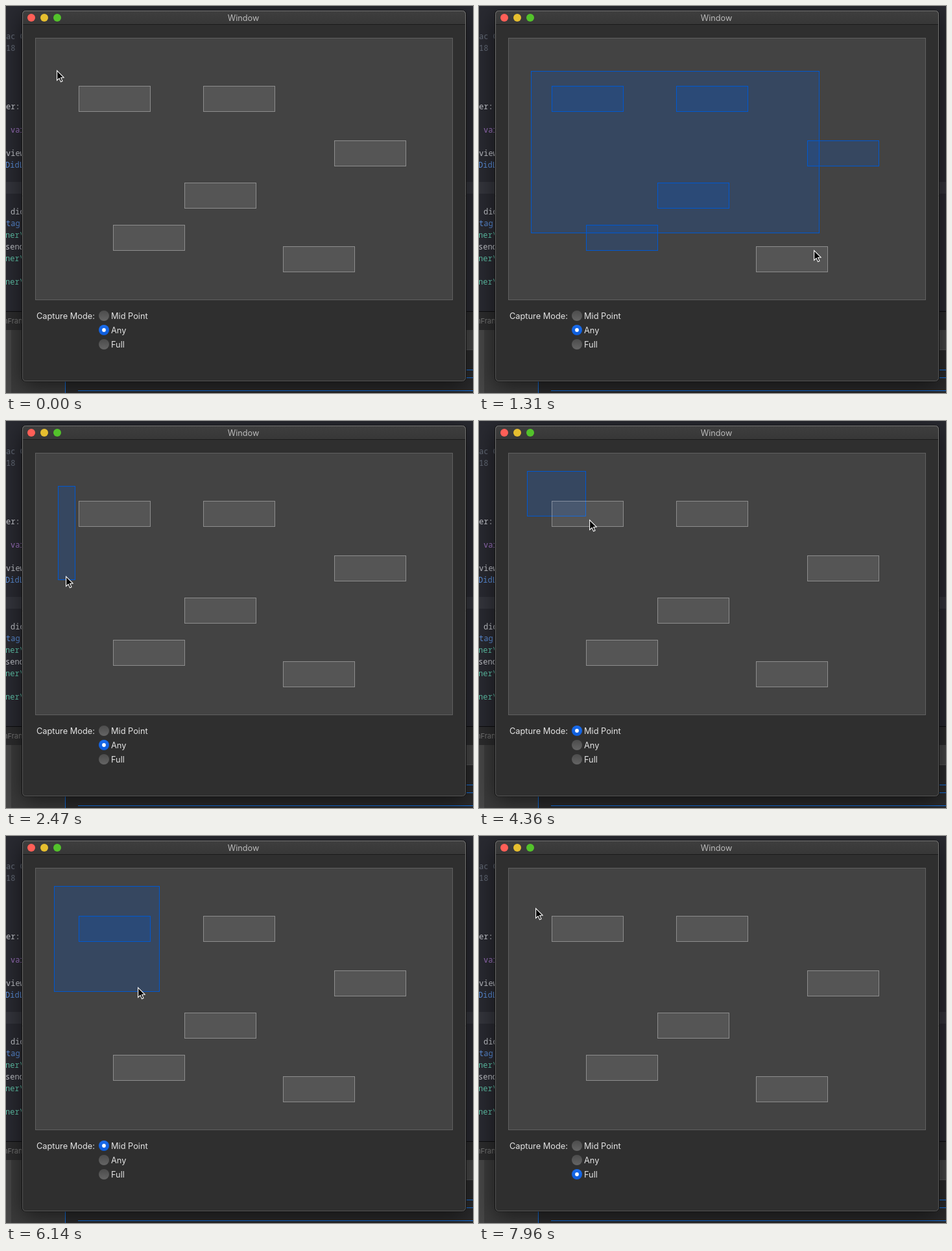
Animation, 720 px wide and 596 px high, one loop 8000 ms. Source, as an HTML page with a canvas:

```html
<!DOCTYPE html>
<html lang="en">
<head>
<meta charset="utf-8">
<title>Capture modes</title>
<style>
html, body { margin: 0; width: 100%; height: 100%; overflow: hidden; background: #222; }
canvas { display: block; }
</style>
</head>
<body>
<canvas id="stage" width="720" height="596"></canvas>
<script>
const W = 720, H = 596, LOOP = 8000;
const ctx = document.getElementById('stage').getContext('2d');
const UI = 'Inter, "Open Sans", sans-serif';
const MONO = '"Noto Sans Mono", "DejaVu Sans Mono", monospace';
const BLUE = '#0058d0';

const boxes = [[112, 123], [304, 123], [506, 207], [275, 272], [165, 337], [427, 370]];
const BOX_W = 111, BOX_H = 40;
const modes = ['Mid Point', 'Any', 'Full'];

// Pointer gestures: time, x, y
const anySweep = [
  [0, 78, 99], [210, 108, 108], [460, 222, 130], [790, 412, 184], [880, 467, 223],
  [960, 490, 247], [1230, 525, 350], [1490, 462, 415], [1670, 401, 410], [1760, 379, 401],
  [2120, 235, 315], [2380, 107, 245], [2470, 92, 239]
];
const pickMid = [
  [2680, 92, 239], [2960, 118, 345], [3320, 149, 478], [3400, 149, 478], [3540, 140, 413],
  [3700, 108, 250], [3920, 67, 77]
];
const midSweep = [
  [4040, 74, 77], [4290, 165, 147], [4360, 170, 152], [4900, 280, 195], [5180, 350, 212],
  [5540, 407, 237], [5870, 345, 246], [5960, 309, 246], [6050, 237, 240], [6140, 203, 233],
  [6320, 163, 228], [6500, 151, 228]
];
const pickFull = [
  [6680, 151, 228], [7000, 150, 380], [7350, 146, 521], [7600, 144, 521], [7780, 118, 300],
  [7960, 87, 111]
];
const path = [...anySweep, ...pickMid, ...midSweep, ...pickFull];

// Screen updates: first time, last time, count
const runs = [
  [50, 790, 10], [880, 1670, 10], [1760, 2560, 10], [2740, 3540, 12], [3600, 4360, 13],
  [4420, 5180, 10], [5270, 6050, 10], [6140, 6500, 5], [6740, 7420, 11], [7660, 7960, 6]
];
const ticks = [0];
for (const [a, b, n] of runs)
  for (let i = 0; i < n; i++)
    ticks.push(Math.floor((a + (b - a) * i / (n - 1)) / 10 + 1e-6) * 10);

const drags = [
  { from: 130, to: 2560, x: 80, y: 100 },
  { from: 4040, to: 6500, x: 74, y: 77 }
];
const modeAt = t => t < 3320 ? 1 : t < 7350 ? 0 : 2;

function slope(i, k) {
  if (i === 0 || i === path.length - 1) return 0;
  const [p, q, r] = [path[i - 1], path[i], path[i + 1]];
  const a = (q[k] - p[k]) / (q[0] - p[0]), b = (r[k] - q[k]) / (r[0] - q[0]);
  return a * b <= 0 ? 0 : 2 * a * b / (a + b);
}

function pointer(t) {
  let i = 0;
  while (i < path.length - 2 && path[i + 1][0] <= t) i++;
  const p = path[i], q = path[i + 1], d = q[0] - p[0];
  const s = Math.min(1, (t - p[0]) / d), s2 = s * s, s3 = s2 * s;
  return [1, 2].map(k => Math.round(
    p[k] * (2 * s3 - 3 * s2 + 1) + q[k] * (3 * s2 - 2 * s3) +
    d * (slope(i, k) * (s3 - 2 * s2 + s) + slope(i + 1, k) * (s3 - s2))));
}

function rect(c, color, x, y, w, h) {
  c.fillStyle = color;
  c.fillRect(x, y, w, h);
}

function frame(c, fill, line, x, y, w, h) {
  rect(c, fill, x, y, w, h);
  c.strokeStyle = line;
  c.lineWidth = 1;
  c.strokeRect(x + 0.5, y + 0.5, w - 1, h - 1);
}

function text(c, str, x, y, color, font, align = 'left') {
  c.font = font;
  c.fillStyle = color;
  c.textAlign = align;
  c.fillText(str, x, y);
}

function disc(c, x, y, r, color) {
  c.fillStyle = color;
  c.beginPath();
  c.arc(x, y, r, 0, Math.PI * 2);
  c.fill();
}

function fade(c, y0, y1, top, bottom) {
  const g = c.createLinearGradient(0, y0, 0, y1);
  g.addColorStop(0, top);
  g.addColorStop(1, bottom);
  return g;
}

function drawEditor(c) {
  rect(c, '#292a31', 0, 0, W, H);
  rect(c, '#34353c', 0, 271, W, 18);
  const gray = '#646b78', light = '#c4c6cc', blue = '#5b8fdc', teal = '#5fc4aa';
  // Lines sit on an 18 px grid.
  const code = [
    ['ac C', 0, 0, gray], ['18 :', 0, 1, gray], ['er:', 0, 6, light],
    ['var', 7, 8, '#a073c4'], ['view', 0, 10, light], ['DidL', -1, 11, blue],
    ['did', 7, 15, light], ['tag', 0, 16, blue], ['ner\\', -1, 17, teal],
    ['send', -1, 18, light], ['ner\\', -1, 19, teal], ['ner\\', -1, 21, teal]
  ];
  for (const [s, x, row, color] of code) text(c, s, x, 51 + 18 * row, color, '12px ' + MONO);
  rect(c, '#0c0c0e', 0, 470, W, 1);
  rect(c, '#2c2c2d', 0, 471, W, 28);
  text(c, 'nFran', -4, 489, '#777', '11px ' + UI);
  rect(c, '#474747', 0, 499, W, 97);
  rect(c, '#3b3b3b', 8, 499, 700, 97);
  rect(c, '#2b2b2c', 91, 529, 629, 67);
  rect(c, '#555', 700, 529, 20, 1);
  rect(c, '#1374e8', 91, 560, 1, 36);
  rect(c, '#1374e8', 700, 560, 20, 1);
  rect(c, '#1374e8', 700, 572, 20, 1);
  rect(c, '#1374e8', 111, 592, 609, 1);
}

function drawWindow(c) {
  c.save();
  c.shadowColor = 'rgba(0,0,0,.55)';
  c.shadowBlur = 34;
  c.shadowOffsetY = 8;
  c.fillStyle = '#111';
  c.beginPath();
  c.roundRect(24, 6.5, 686, 572, 6);
  c.fill();
  c.restore();

  c.save();
  c.beginPath();
  c.roundRect(25, 7, 684, 571, 5);
  c.clip();
  rect(c, '#2f2f2f', 25, 7, 684, 571);
  rect(c, fade(c, 8, 28, '#3e3e3e', '#373737'), 25, 7, 684, 21);
  rect(c, '#1b1b1b', 25, 28, 684, 1);
  c.restore();
  c.strokeStyle = fade(c, 7, 578, '#757575', '#555');
  c.lineWidth = 1;
  c.beginPath();
  c.roundRect(25.5, 7.5, 683, 570, 5);
  c.stroke();

  ['#ff5f57', '#e6bf2f', '#53c22b'].forEach((color, i) => disc(c, 39 + 20 * i, 18, 6, color));
  text(c, 'Window', 366, 23, '#bababa', '12.7px ' + UI, 'center');
  frame(c, '#434343', '#606060', 45, 49, 644, 404);
  text(c, 'Capture Mode:', 47, 482, '#e4e4e4', '12.8px ' + UI);
  modes.forEach((m, i) => text(c, m, 162, 482 + 22 * i, '#e4e4e4', '12.8px ' + UI));
}

const backdrop = document.createElement('canvas');
backdrop.width = W;
backdrop.height = H;
drawEditor(backdrop.getContext('2d'));
drawWindow(backdrop.getContext('2d'));

function drawRadios(active) {
  modes.forEach((_, i) => {
    const y = 477 + 22 * i, on = i === active;
    disc(ctx, 151, y, 8, on ? fade(ctx, y - 8, y + 8, '#1a6cec', '#0d5cda')
                            : fade(ctx, y - 8, y + 8, '#4c4c4c', '#656565'));
    if (on) disc(ctx, 151, y, 2.9, '#fff');
  });
}

function captured([x, y], sel, mode) {
  if (!sel) return false;
  const [l, t, r, b] = sel, x2 = x + BOX_W, y2 = y + BOX_H;
  if (mode === 1) return l < x2 && r > x && t < y2 && b > y;
  if (mode === 2) return l <= x && r >= x2 && t <= y && b >= y2;
  const mx = x + BOX_W / 2, my = y + BOX_H / 2;
  return mx > l && mx < r && my > t && my < b;
}

function drawPointer(x, y) {
  const shape = [[0, 0], [0, 15], [3.5, 11.8], [5.9, 17.2], [8.4, 16.1], [6, 10.9], [10.5, 10.6]];
  ctx.beginPath();
  for (const [dx, dy] of shape) ctx.lineTo(x + 0.6 + dx, y + 0.5 + dy);
  ctx.closePath();
  ctx.fillStyle = '#000';
  ctx.fill();
  ctx.strokeStyle = '#fff';
  ctx.lineWidth = 1.1;
  ctx.stroke();
}

function draw(time) {
  let i = ticks.length - 1;
  while (i > 0 && ticks[i] > time) i--;
  const t = ticks[i], mode = modeAt(t);
  const drag = drags.find(d => t >= d.from && t < d.to);
  let sel = null;
  if (drag) {
    // The marquee trails the pointer by one update.
    const [x, y] = pointer(Math.max(drag.from, ticks[i - 1]));
    sel = [Math.min(drag.x, x), Math.min(drag.y, y), Math.max(drag.x, x), Math.max(drag.y, y)];
    if (sel[2] - sel[0] < 2 || sel[3] - sel[1] < 2) sel = null;
  }

  ctx.drawImage(backdrop, 0, 0);
  drawRadios(mode);
  if (sel) frame(ctx, 'rgba(0,88,208,.2)', BLUE, sel[0], sel[1], sel[2] - sel[0], sel[3] - sel[1]);
  for (const b of boxes) {
    const on = captured(b, sel, mode);
    frame(ctx, on ? 'rgba(0,88,208,.2)' : 'rgba(255,255,255,.095)',
          on ? BLUE : 'rgba(255,255,255,.33)', b[0], b[1], BOX_W, BOX_H);
  }
  drawPointer(...pointer(t));
}

function loop() {
  draw(performance.now() % LOOP);
  requestAnimationFrame(loop);
}
loop();
</script>
</body>
</html>
```
